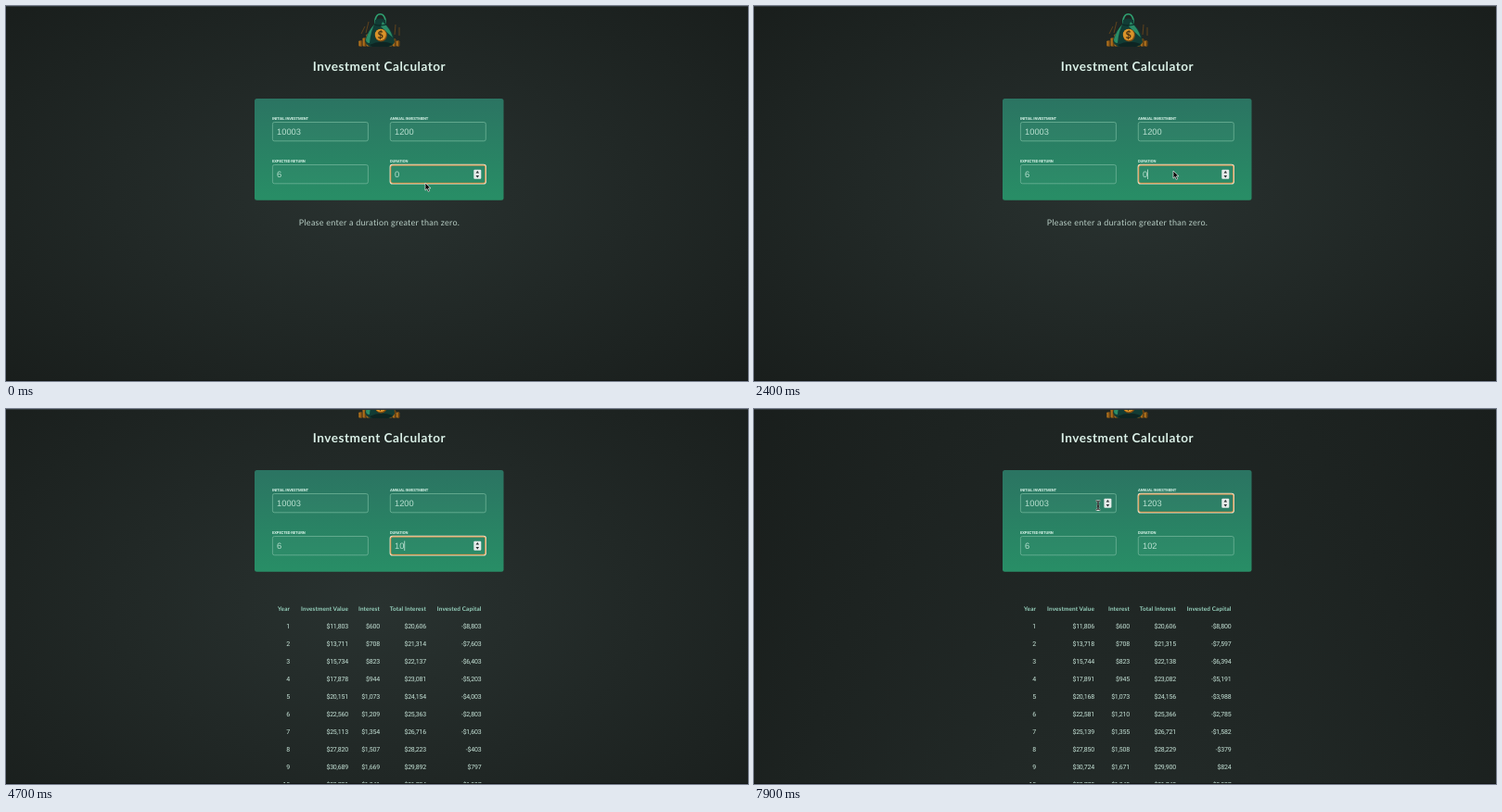
Write an HTML page that moves like this. It is 800 by 405 pixels and loops after 8 s.

```html
<!DOCTYPE html>
<html lang="en">
<head>
<meta charset="utf-8">
<title>Investment Calculator</title>
<style>
  html, body { margin: 0; width: 100%; height: 100%; overflow: hidden; background: #1b201e; }
  svg { display: block; width: 800px; height: 405px; text-rendering: geometricPrecision; }
  .title { font: 700 13.6px Quicksand, Lato, sans-serif; letter-spacing: .5px; fill: #d9efe6; text-anchor: middle; }
  .note { font: 400 9px Quicksand, Lato, sans-serif; letter-spacing: .26px; fill: #b9cfc6; text-anchor: middle; }
  .label { font: 700 4.2px Roboto, sans-serif; letter-spacing: -.14px; fill: #d2f0e4; }
  .value { font: 9.3px "Liberation Sans", Arial, sans-serif; fill: #b9e0d0; }
  .head { font: 700 6.4px Quicksand, Lato, sans-serif; letter-spacing: .12px; fill: #98d3bf; text-anchor: end; }
  .cell { font: 400 7px Roboto, sans-serif; letter-spacing: -.2px; fill: #c8e6da; text-anchor: end; }
</style>
</head>
<body>
<svg id="stage" viewBox="0 0 800 405"></svg>
<script>
const LOOP = 8000, INITIAL = 10003, RATE = .06;
const stage = document.getElementById('stage');
const HEADS = ['Year', 'Investment Value', 'Interest', 'Total Interest', 'Invested Capital'];
const COLS_SHORT = [306, 369, 403, 453, 512.5];
const COLS_LONG = [304, 367, 405, 455, 514.5];

// Pointer keyframes: time, x, y
const PATH = [
  [0, 452, 191], [200, 452, 191], [900, 452, 178], [5400, 452, 178],
  [5800, 453, 106], [6000, 453, 106], [6500, 508, 98], [7200, 508, 98], [7800, 371, 104], [LOOP, 371, 104]
];

const text = (cls, x, y, s) => `<text class="${cls}" x="${x}" y="${y}">${s}</text>`;
const rect = (x, y, w, h, rest) => `<rect x="${x}" y="${y}" width="${w}" height="${h}" ${rest}/>`;
const path = (d, rest) => `<path d="${d}" ${rest}/>`;
const oval = (x, y, rx, ry, fill) => `<ellipse cx="${x}" cy="${y}" rx="${rx}" ry="${ry}" fill="${fill}"/>`;

// Latest value from a list of [start, value]
const pick = (t, list) => list.filter(([start]) => t >= start).pop()[1];

function money(n) {
  const s = '$' + Math.abs(Math.round(n)).toLocaleString('en-US');
  return n < 0 ? '-' + s : s;
}

function pointerAt(t) {
  const i = PATH.findIndex(k => k[0] > t);
  const [t0, x0, y0] = PATH[i - 1], [t1, x1, y1] = PATH[i];
  const p = (t - t0) / (t1 - t0), e = p * p * (3 - 2 * p);
  return [x0 + (x1 - x0) * e, y0 + (y1 - y0) * e];
}

const stack = (x, h) => rect(x, 43.5 - h, 3.6, h, 'rx=".8" fill="#ad6f1c"') +
  rect(x + 2.2, 43.5 - h, 1.4, h, 'rx=".6" fill="#69410f"');

const bag =
  path('M383 30l4-8M388 29l3-12M424 32v-9M419 31l1-11', 'stroke="#5f421d" stroke-width="1"') +
  stack(380.3, 6) + stack(384.5, 9) + stack(388.5, 13) + stack(412.5, 11) + stack(416.6, 8) + stack(420.6, 6) +
  path('M398 20C396 5 411 5 409 20', 'fill="none" stroke="#2f9f70" stroke-width="1.6"') +
  path('M398 15Q403 12 409 15L410 20Q419 30 419 39Q417 44 410 44H396Q389 44 387 38Q390 27 397 20Z', 'fill="#123c35"') +
  path('M399 16Q393 27 392 40Q388 40 388 36Q391 26 397 20ZM406 17Q414 24 417 34Q410 28 404 22Z', 'fill="#2a8c67"') +
  path('M397 20Q403 22 410 20', 'fill="none" stroke="#0c2b27" stroke-width="1.3"') +
  path('M392 42Q404 36 417 41L412 44H395Z', 'fill="#0e2422"') +
  oval(404.4, 31.6, 6.6, 6.8, '#7c4a12') + oval(403.8, 31, 6, 6.2, '#d9932a') +
  '<text x="403.8" y="35" text-anchor="middle" fill="#453012" style="font:700 11px Lato,sans-serif">$</text>';

function spinner(x, y, lit) {
  return rect(x + 90, y + 5.2, 8, 10, 'rx="1" fill="#e6ecea"') +
    (lit ? rect(x + 90, y + 5.2, 8, 5, 'rx="1" fill="#a3a9aa"') : '') +
    path(`M${x + 92.2} ${y + 9}h3.6l-1.8-2.4zM${x + 92.2} ${y + 11.6}h3.6l-1.8 2.4z`, 'fill="#2a3233"');
}

function field(f, state) {
  const { x, y, label, value } = f;
  const focus = state.focus === f.id, over = state.hover === f.id;
  let s = text('label', x - .3, y - 3, label);
  if (focus) {
    s += rect(x, y, 103, 20.3, 'rx="2.4" fill="#fff" fill-opacity=".02" stroke="#f1e6d2" stroke-width="1.4"') +
      rect(x + .5, y + .5, 102, 19.3, 'rx="2" fill="none" stroke="#d98a35" stroke-width=".9"');
  } else {
    s += rect(x, y, 103, 20.3, 'rx="2" fill="#fff" fill-opacity=".02" stroke="#6fb498" stroke-width=".8"');
  }
  s += text('value', x + 4.7, y + 13.6, value);
  if (focus || over) s += spinner(x, y, over && state.onSpin);
  if (focus && state.caret >= 0)
    s += rect(x + 4.8 + state.caret * 5.17, y + 5, .7, 10.5, 'fill="#dff3ea"');
  return s;
}

function table(annual, cols) {
  let s = HEADS.map((h, i) => text('head', cols[i], 252.3, h)).join('');
  let total = INITIAL;
  for (let year = 1; year <= 10; year++) {
    const interest = total * RATE;
    total += interest + annual;
    const capital = annual * year - INITIAL;
    const row = [year, money(total), money(interest), money(total - capital), money(capital)];
    s += row.map((c, i) => text('cell', cols[i], 252 + 19 * year, c)).join('');
  }
  return s;
}

function pointer(x, y, beam) {
  if (beam) {
    const d = `M${x - 2.3} ${y - 5}q2.3 0 2.3 1.8v6.4q0 1.8-2.3 1.8M${x + 2.3} ${y - 5}q-2.3 0-2.3 1.8v6.4q0 1.8 2.3 1.8M${x - 1.5} ${y + 1}h3`;
    return path(d, 'fill="none" stroke="#dfe8e4" stroke-width="2.2"') +
      path(d, 'fill="none" stroke="#1a1a1a" stroke-width="1"');
  }
  return path(`M${x} ${y}v8.2l1.9-1.8 1.3 3 1.5-.7-1.3-2.9h2.6z`,
    'fill="#080808" stroke="#eef2f0" stroke-width=".7" stroke-linejoin="round"');
}

function draw(t) {
  const duration = pick(t, [[0, '0'], [2700, '10'], [4850, '102']]);
  const annual = pick(t, [[0, 1200], [6800, 1201], [6950, 1202], [7100, 1203]]);
  const scroll = t < 2700 ? 0 : 34;
  const height = pick(t, [[0, 405], [2700, 490], [4850, 2220]]);
  const focus = t < 6550 ? 'duration' : 'annual';
  const [caretStart, caretPos] = pick(t, [[0, [-600, 1]], [2700, [2700, 1]], [4500, [4500, 2]], [4850, [4850, 3]], [6550, [0, -1]]]);
  const caret = (t - caretStart) % 1000 < 500 ? caretPos : -1;

  const fields = [
    { id: 'initial', x: 287.4, y: 125.5, label: 'INITIAL INVESTMENT', value: INITIAL },
    { id: 'annual', x: 414.3, y: 125.5, label: 'ANNUAL INVESTMENT', value: annual },
    { id: 'return', x: 287.4, y: 171.5, label: 'EXPECTED RETURN', value: 6 },
    { id: 'duration', x: 414.3, y: 171.5, label: 'DURATION', value: duration }
  ];
  const [px, py] = pointerAt(t);
  const hidden = t >= 2700 && t < 5400;
  const under = hidden ? null : fields.find(f =>
    px > f.x && px < f.x + 103 && py + scroll > f.y && py + scroll < f.y + 20.3);
  const onSpin = !!under && px > under.x + 89;
  const state = { focus, caret, hover: under && under.id, onSpin };

  stage.style.background =
    `radial-gradient(ellipse 566px ${height * .707}px at 400px ${height / 2 - scroll}px, #293230, #191e1c)`;
  stage.innerHTML =
    '<defs><linearGradient id="card" x2="0" y2="1"><stop stop-color="#2b7462"/><stop offset="1" stop-color="#288e66"/></linearGradient></defs>' +
    `<g transform="translate(0 ${-scroll})">` + bag +
    text('title', 402.5, 69.7, 'Investment Calculator') +
    rect(268, 100, 268.5, 109.8, 'rx="2.5" fill="url(#card)"') +
    fields.map(f => field(f, state)).join('') +
    (duration === '0'
      ? text('note', 402.5, 236.7, 'Please enter a duration greater than zero.')
      : table(annual, duration === '10' ? COLS_SHORT : COLS_LONG)) +
    '</g>' +
    rect(0, 0, 800, 1, 'fill="#30383a"') + rect(0, 404, 800, 1, 'fill="#121615"') +
    (hidden ? '' : pointer(px, py, t > 2700 && under && !onSpin));
}

function tick() {
  draw(performance.now() % LOOP);
  requestAnimationFrame(tick);
}
tick();
</script>
</body>
</html>
```
